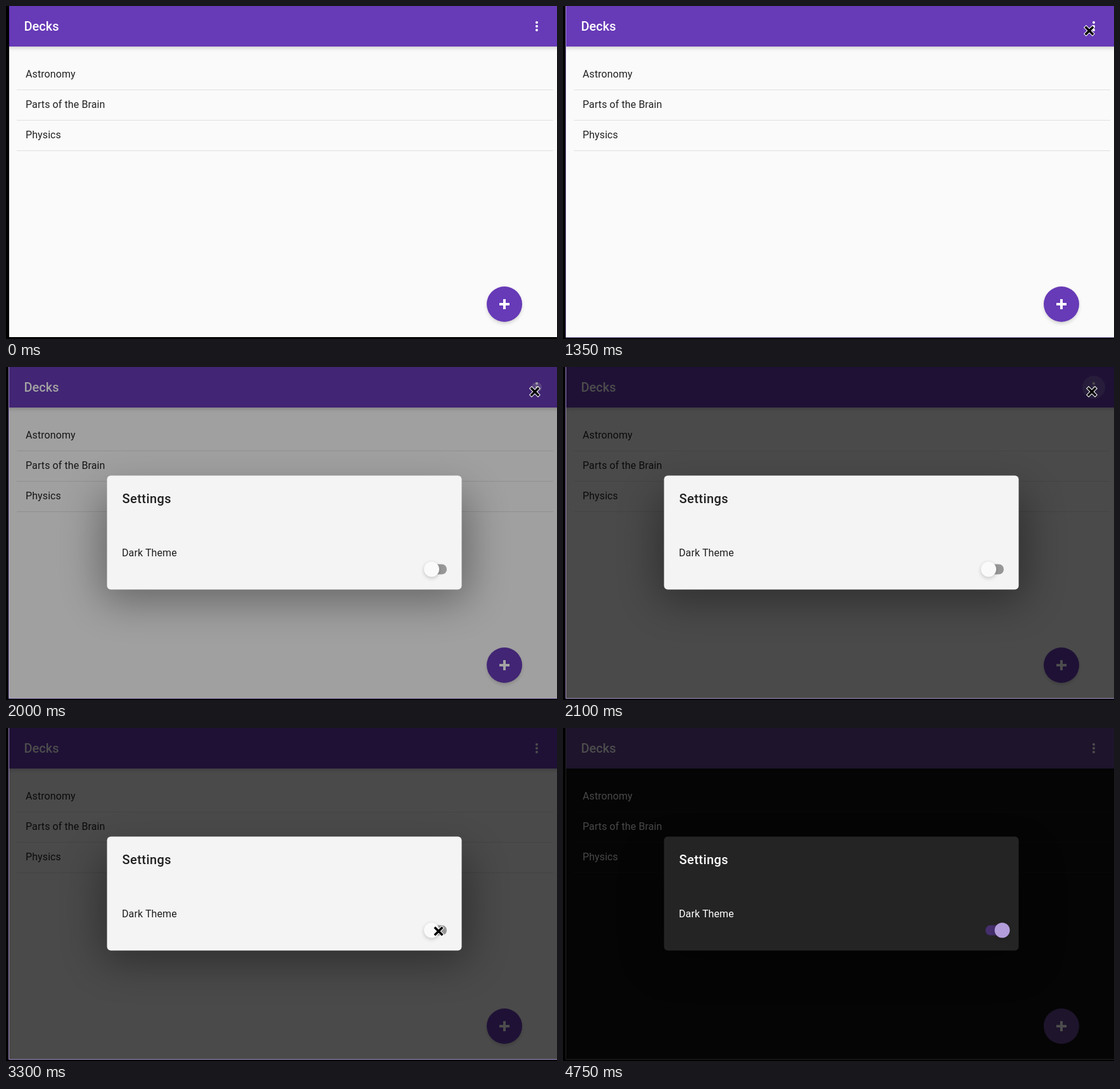
An HTML page for the animation above (4.85 s loop, 870 px wide and 526 px high).

```html
<!DOCTYPE html>
<html lang="en">
<head>
<meta charset="utf-8">
<title>Decks</title>
<style>
  html, body { margin: 0; width: 100%; height: 100%; overflow: hidden; background: #000; }
  svg { display: block; width: 870px; height: 526px; font: 400 16px Roboto, sans-serif; letter-spacing: .1px; }
  .bg { fill: var(--bg); }
  .bar { fill: var(--bar); }
  .on-bar { fill: #fff; }
  .text { fill: var(--text); }
  .lines { stroke: var(--line); }
  .shade { opacity: .2; }
  .panel { fill: var(--panel); }
  .ink { fill: var(--ink); }
  .title { font-size: 20px; font-weight: 500; letter-spacing: 0; }
  .heading { letter-spacing: .45px; }
  #track { fill: var(--track); }
  #thumb { fill: var(--thumb); }
  #frame { fill: none; stroke: var(--frame); }
</style>
</head>
<body>
<svg viewBox="0 0 870 526">
  <defs>
    <filter id="soft" x="-20%" y="-60%" width="140%" height="220%"><feGaussianBlur stdDeviation="3"/></filter>
    <filter id="wide" x="-40%" y="-100%" width="180%" height="300%"><feGaussianBlur stdDeviation="32"/></filter>
    <clipPath id="page"><rect x="5" width="865" height="523"/></clipPath>
  </defs>
  <rect width="870" height="526"/>
  <g clip-path="url(#page)">
    <rect class="bg" x="5" width="865" height="523"/>
    <rect class="shade" x="0" y="50" width="880" height="16" filter="url(#soft)"/>
    <rect class="bar" x="5" width="865" height="64"/>
    <circle id="menuRipple" cx="838" cy="32" fill="#fff"/>
    <text class="title on-bar" x="28.5" y="39">Decks</text>
    <g class="on-bar">
      <circle cx="838" cy="26" r="2"/><circle cx="838" cy="32" r="2"/><circle cx="838" cy="38" r="2"/>
    </g>
    <g class="text">
      <text x="31" y="113">Astronomy</text>
      <text x="31" y="161">Parts of the Brain</text>
      <text x="31" y="209">Physics</text>
    </g>
    <path class="lines" d="M17 132.5H864M17 180.5H864M17 228.5H864"/>
    <circle class="shade" cx="787" cy="474" r="27" filter="url(#soft)"/>
    <circle class="bar" cx="787" cy="471" r="28"/>
    <path class="on-bar" d="M785 463h4v6h6v4h-6v6h-4v-6h-6v-4h6z"/>
    <rect id="scrim" width="870" height="526"/>
    <g id="dialog">
      <rect x="150" y="200" width="580" height="170" rx="20" opacity=".36" filter="url(#wide)"/>
      <rect class="panel" x="159.5" y="171.5" width="560" height="180" rx="6"/>
      <text class="title heading ink" x="183.5" y="215">Settings</text>
      <text class="ink" x="183" y="299">Dark Theme</text>
      <circle id="thumbRipple" cy="319.5" r="20" fill="#b39ddb"/>
      <rect id="track" x="667" y="311.5" width="29" height="16" rx="8"/>
      <circle id="thumbShade" class="shade" cy="321.5" r="12" filter="url(#soft)"/>
      <circle id="thumb" cy="319.5" r="12"/>
    </g>
  </g>
  <path id="frame" d="M4.5 0V523.5H870"/>
  <g id="cursor" fill="none" stroke-linecap="square">
    <path d="M-5 -5L5 5M-5 5L5 -5" stroke="#fff" stroke-width="5.6"/>
    <path d="M-5 -5L5 5M-5 5L5 -5" stroke="#000" stroke-width="3.6"/>
  </g>
</svg>
<script>
const LOOP = 4850, STEP = 50;
const $ = id => document.getElementById(id);
const root = document.documentElement;

// Light and dark theme colours.
const themes = {
  bg:    ['#fafafa', '#121212'],
  bar:   ['#673ab7', '#644393'],
  text:  ['#212121', '#f0f0f0'],
  line:  ['#e0e0e0', '#1c1c1c'],
  panel: ['#f4f4f4', '#242424'],
  ink:   ['#1f1f1f', '#ffffff'],
  track: ['#979797', '#452f6d'],
  thumb: ['#fafafa', '#b39ddb']
};

// Rows of time, then values.
const scrimFade = [[1900, 0], [2000, .36], [2100, .7]];
const dialogFade = [[1900, 0], [1950, .6], [2000, 1]];
const darkState = [[3400, 0], [3600, 1]];
const menuRipple = [[1950, 0, .25], [2000, 8, .25], [2100, 18, .2], [2200, 20, .2], [2600, 20, 0]];
const thumbRipple = [[3350, 0], [3450, .15], [3750, .08], [4050, 0]];
const pointer = [
  [300, 400, 540], [1250, 828, 40], [1350, 831, 39], [1600, 835, 39], [2350, 835, 39],
  [3200, 683, 321], [3500, 683, 321], [3750, 608, 375], [4150, 384, 536]
];

const mix = (a, b, k) => a + (b - a) * k;
const smooth = k => k * k * (3 - 2 * k);
const channels = hex => [1, 3, 5].map(i => parseInt(hex.slice(i, i + 2), 16));

function sample(table, time, ease = k => k) {
  const next = table.findIndex(row => row[0] > time);
  if (next === 0) return table[0].slice(1);
  if (next < 0) return table[table.length - 1].slice(1);
  const [from, to] = [table[next - 1], table[next]];
  const k = ease((time - from[0]) / (to[0] - from[0]));
  return from.slice(1).map((v, i) => mix(v, to[i + 1], k));
}

function paint(dark) {
  for (const [name, pair] of Object.entries(themes)) {
    const [a, b] = pair.map(channels);
    const rgb = a.map((v, i) => Math.round(mix(v, b[i], dark)));
    root.style.setProperty('--' + name, `rgb(${rgb})`);
  }
}

function set(id, attributes) {
  for (const name in attributes) $(id).setAttribute(name, attributes[name]);
}

function frameColor(time) {
  if (time < 50) return '#000';
  if (time < 4700) return '#a48fce';
  return time < 4750 ? '#665c78' : '#232323';
}

function draw(time) {
  const [dark] = sample(darkState, time);
  paint(dark);
  root.style.setProperty('--frame', frameColor(time));

  const [radius, strength] = sample(menuRipple, time);
  set('menuRipple', { r: radius, opacity: strength });
  set('scrim', { opacity: sample(scrimFade, time)[0] });
  set('dialog', { opacity: sample(dialogFade, time)[0] });

  const thumbX = mix(672, 693.5, smooth(dark));
  set('thumb', { cx: thumbX });
  set('thumbShade', { cx: thumbX });
  set('thumbRipple', { cx: thumbX, opacity: sample(thumbRipple, time)[0] });

  const [x, y] = sample(pointer, time, smooth);
  set('cursor', { transform: `translate(${Math.round(x)} ${Math.round(y)})` });
}

const start = performance.now();
function tick() {
  const time = (performance.now() - start) % LOOP;
  draw(Math.floor(time / STEP) * STEP);
  requestAnimationFrame(tick);
}
tick();
</script>
</body>
</html>
```
